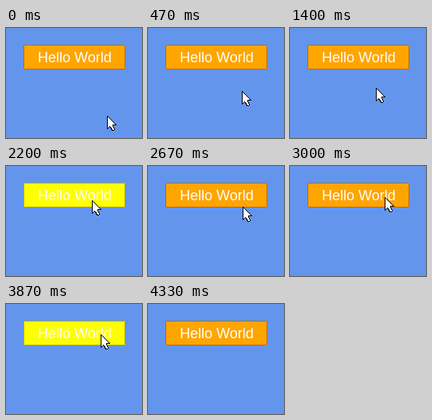
Animation of 171x138 px, one loop 4940 ms. Source, as an HTML page:

```html
<!DOCTYPE html>
<html lang="en">
<head>
<meta charset="utf-8">
<title>Button hover</title>
<style>
  html, body { margin: 0; width: 100%; height: 100%; overflow: hidden; background: #6495ed; }
  svg { display: block; width: 171px; height: 138px; }
  text { font: 18px "Liberation Sans", Arial, sans-serif; fill: #fff; }
  #button { stroke: #000; stroke-opacity: .32; }
  #cursor { fill: #fff; stroke: #000; stroke-linejoin: round; shape-rendering: crispEdges; }
</style>
</head>
<body>
<svg viewBox="0 0 171 138">
  <rect x="22" y="21" width="128" height="31" rx="1" id="fill"/>
  <rect x="22.5" y="21.5" width="127" height="30" rx=".8" id="button" fill="none"/>
  <text x="40" y="43">Hello World</text>
  <path id="cursor" d="M.5 .5V16.5L3.5 13.5L4.5 14.5L6.5 18.5H8.5L9.5 17.5L7.5 12.5V11.5H11.5Z"/>
</svg>
<script>
const LOOP = 4940;
const TICK = 1000 / 15;
const BUTTON_BOTTOM = 51;
const home = { x: 127, y: 110 };

// Pointer moves in ticks, each towards a new resting point.
const moves = [
  { from: 2, to: 10, x: 117, y: 74 },
  { from: 10, to: 16, x: 108, y: 45 },
  { from: 19, to: 23, x: 108, y: 85 },
  { from: 24, to: 28, x: 108, y: 44 },
  { from: 32, to: 33, x: 108, y: 43 },
  { from: 33, to: 37, x: 111, y: 88 },
  { from: 37, to: 40, x: 119, y: 51 },
  { from: 40, to: 42, x: 119, y: 39 },
  { from: 52, to: 53, x: 119, y: 38 },
  { from: 59, to: 65, x: 122, y: 140 }
];
const presses = [{ from: 45, to: 49 }, { from: 54, to: 58 }];

const fill = document.getElementById('fill');
const cursor = document.getElementById('cursor');
const easeOut = p => 1 - (1 - p) ** 2;
const mix = (a, b, k) => a + (b - a) * k;

function pointerAt(tick) {
  let { x, y } = home;
  for (const move of moves) {
    if (tick <= move.from) break;
    const k = easeOut(Math.min(1, (tick - move.from) / (move.to - move.from)));
    x = mix(x, move.x, k);
    y = mix(y, move.y, k);
  }
  return { x: Math.round(x), y: Math.round(y) };
}

function draw(now) {
  // The small offset absorbs rounding of tick times to 10 ms.
  const tick = Math.floor((now % LOOP + 5) / TICK);
  const { x, y } = pointerAt(tick);
  const pressed = presses.some(p => tick >= p.from && tick < p.to);
  const lit = y < BUTTON_BOTTOM && !pressed;
  cursor.setAttribute('transform', `translate(${x} ${y})`);
  fill.setAttribute('fill', lit ? '#ffff00' : '#ffa500');
}

const start = performance.now();
function frame() {
  draw(performance.now() - start);
  requestAnimationFrame(frame);
}
frame();
</script>
</body>
</html>
```
